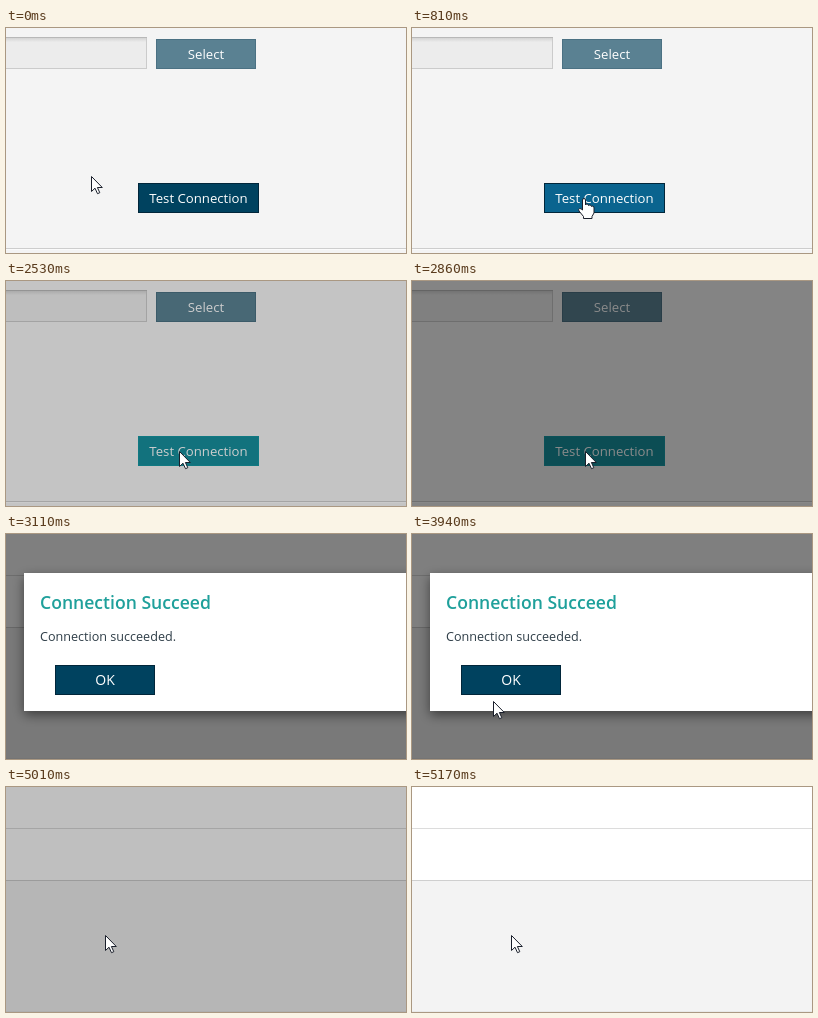
Recreate the animation shown at these times as an HTML page. Size 400 by 225 pixels, loop 5250 ms.

```html
<!DOCTYPE html>
<html lang="en">
<head>
<meta charset="utf-8">
<title>Test connection</title>
<style>
html, body { margin: 0; width: 100%; height: 100%; overflow: hidden; background: #f4f4f4; }
svg { display: block; width: 100vw; height: 100vh; }
text { font: 13.2px "Open Sans", "Noto Sans", sans-serif; fill: #fff; }
.mid { text-anchor: middle; }
#cursor path { fill: #fff; stroke: #1a1f2b; stroke-linejoin: round; }
</style>
</head>
<body>
<svg viewBox="0 0 400 225">
  <defs>
    <linearGradient id="inset" x2="0" y2="1">
      <stop stop-color="#d2d2d2"/>
      <stop offset=".15" stop-color="#ececec"/>
    </linearGradient>
    <filter id="shadow" x="-10%" y="-20%" width="120%" height="150%">
      <feDropShadow dx="0" dy="4" stdDeviation="6" flood-opacity=".5"/>
    </filter>
  </defs>

  <g id="form">
    <path fill="#f4f4f4" d="M0 0h400v225H0z"/>
    <rect x="-5.5" y="9.5" width="146" height="31" fill="url(#inset)" stroke="#cbcbcb"/>
    <path stroke="#b8b8b8" d="M0 9.5h141"/>
    <rect x="150.5" y="11.5" width="99" height="29" fill="#5a8192" stroke="#4b7183"/>
    <text class="mid" x="200" y="31">Select</text>
    <rect id="test" x="132.5" y="155.5" width="120" height="29"/>
    <text class="mid" x="192.5" y="175">Test Connection</text>
    <path stroke="#cdcdcd" d="M0 220.5h400"/>
    <path stroke="#fbfbfb" d="M0 221.5h400"/>
  </g>

  <g id="page">
    <path fill="#fff" d="M0 0h400v94H0z"/>
    <path fill="#f3f3f3" d="M0 94h400v131H0z"/>
    <path stroke="#dcdcdc" d="M0 41.5h400"/>
    <path stroke="#cfcfcf" d="M0 93.5h400"/>
    <path stroke="#e9e9e9" d="M0 224.5h400"/>
  </g>

  <path id="dim" d="M0 0h400v225H0z"/>

  <g id="spinner" fill="none" stroke-width="4">
    <circle cx="397" cy="119" r="48" stroke="#fff"/>
    <path id="arc" stroke="#179a9c" d="M363.06 85.06a48 48 0 0 1 67.88 0"/>
  </g>

  <g id="dialog">
    <rect x="18" y="39" width="440" height="138" fill="#fff" filter="url(#shadow)"/>
    <text x="34" y="75" style="font-size:17.6px;font-weight:600;fill:#1fa09b">Connection Succeed</text>
    <text x="34" y="107" style="font-size:12.6px;fill:#2f3e48">Connection succeeded.</text>
    <rect id="ok" x="49.5" y="131.5" width="99" height="29"/>
    <text id="okText" class="mid" x="99" y="151" style="font-size:14px">OK</text>
  </g>

  <g id="cursor">
    <path id="arrow" d="M.5 .5V15.5L4 12.2 6.5 17.7 8.8 16.7 6.4 11.5H11.3Z"/>
    <path id="hand" d="M-2.5 12V2Q-2.5 .5 -1 .5T.5 2V7Q.5 6 2 6T3.5 7.5Q3.5 6.8 5 7T6.5 8.5Q6.8 7.8 8 8.2T9 10V15L7 18.5V20.5H-1.5V18.5L-6 13Q-7 11 -5.5 10.6T-2.5 12Z"/>
  </g>
</svg>
<script>
const LOOP = 5250, TICK = 82;
const NORMAL = ['#00425f', '#01263a'], HOVER = ['#0a648f', '#01263a'];
const FOCUS = ['#168e9b', '#1496a2'], PRESSED = ['#0a648f', '#0f7f8f'];

const el = id => document.getElementById(id);
const clamp = v => Math.max(0, Math.min(1, v));
const mix = (a, b, u) => a + (b - a) * u;
const show = (id, on) => el(id).style.display = on ? '' : 'none';
const paint = (id, [fill, stroke]) => {
  el(id).setAttribute('fill', fill);
  el(id).setAttribute('stroke', stroke);
};

function dimAt(n) {
  if (n >= 20 && n < 23) return 0.2;          // loading veil
  if (n < 38) return 0.46 * clamp((n - 28) / 7);
  return 0.5 * clamp((63 - n) / 4);
}

function cursorAt(n) {
  if (n < 38) {
    const u = (1 - Math.cos(Math.PI * clamp(n / 10.2))) / 2;
    return [mix(85, 173, u), mix(148, 170, u)];
  }
  const u = 1 - (1 - clamp((n - 44) / 9.4)) ** 2;
  return [mix(44, 99, u), mix(205, 148, u)];
}

function draw(t) {
  const n = Math.min(63, Math.floor((t + 12) / TICK));
  const [x, y] = cursorAt(n).map(Math.round);
  const onForm = n < 38, open = n >= 38 && n < 60;
  const overTest = onForm && x > 132 && y > 155;
  const overOk = open && y < 161;

  show('form', onForm);
  show('page', !onForm);
  show('dialog', open);
  el('dim').setAttribute('opacity', dimAt(n));

  show('spinner', n >= 20 && n < 23);
  el('arc').setAttribute('transform', `rotate(${12 + (n - 20) * 15} 397 119)`);

  paint('test', n >= 17 ? FOCUS : overTest ? HOVER : NORMAL);
  paint('ok', n >= 58 ? PRESSED : overOk ? HOVER : NORMAL);
  el('okText').style.fill = n >= 58 ? '#d5e2ea' : '#fff';

  const pointing = overTest && n < 20 || overOk;
  show('cursor', onForm || n >= 44);
  show('hand', pointing);
  show('arrow', !pointing);
  el('cursor').setAttribute('transform', `translate(${x} ${y})`);
}

function loop() {
  draw(performance.now() % LOOP);
  requestAnimationFrame(loop);
}
loop();
</script>
</body>
</html>
```
